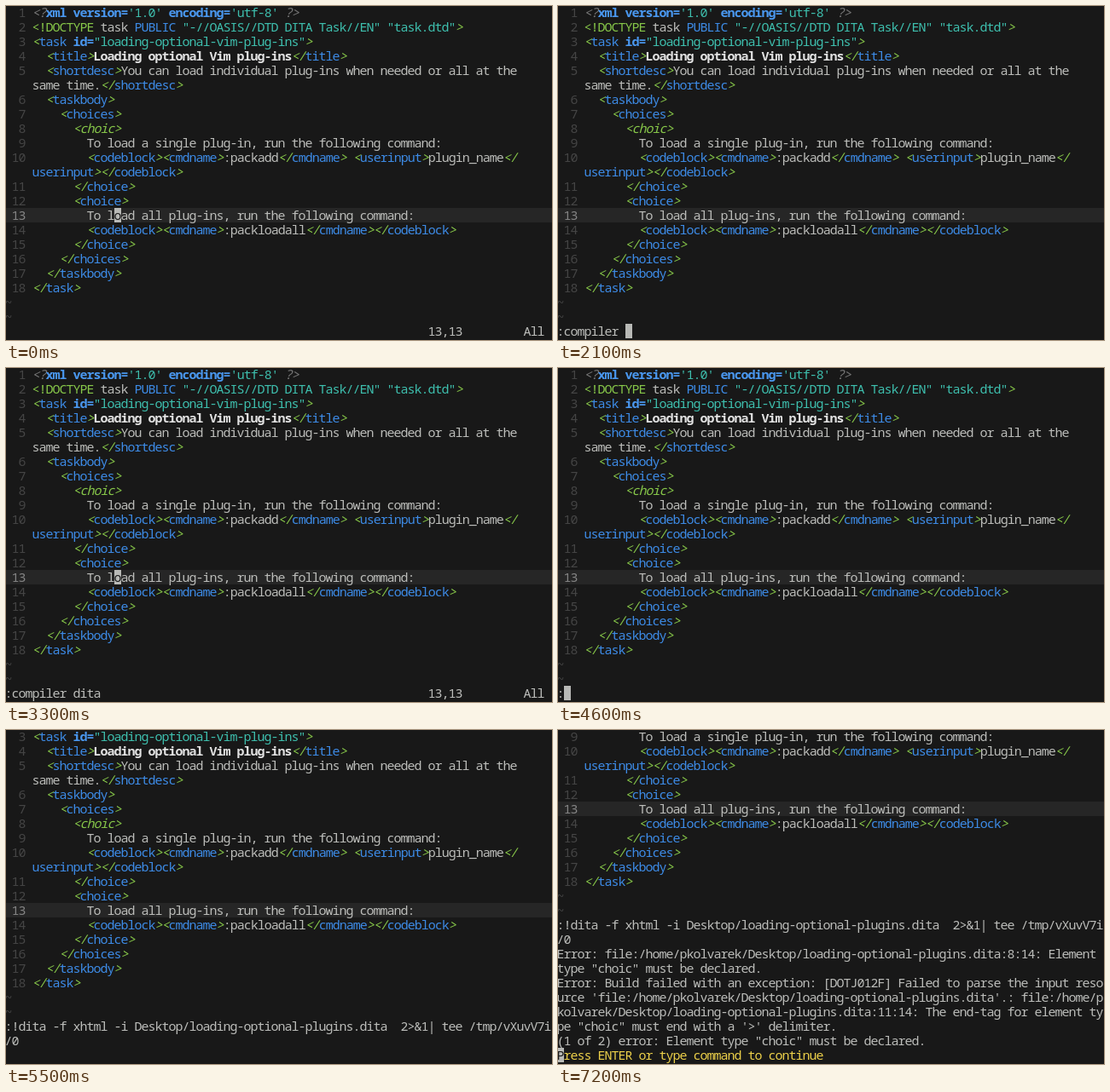
Write an HTML page that moves like this. It is 640x392 px and loops after 8000 ms.

```html
<!DOCTYPE html>
<html lang="en">
<head>
<meta charset="utf-8">
<title>Vim: compiling a DITA topic</title>
<style>
  html, body { margin: 0; width: 100%; height: 100%; overflow: hidden; background: #181818; }
  #stage { position: relative; width: 640px; height: 392px; overflow: hidden; }
  #screen { position: absolute; left: -1px; top: -1px; width: 641px; height: 393px; }
  #buffer, #log { position: absolute; left: 0; width: 100%; }
  .row {
    height: 17px;
    color: #bcbdba;
    font: 15px/17px "Noto Sans Mono", monospace;
    letter-spacing: -1px;
    text-indent: -0.5px;
    font-variant-ligatures: none;
    white-space: pre;
  }
  .current { background: #262626; }
  .num, .tilde { color: #454545; }
  .current .num { color: #858585; }
  .dim { color: #777; font-style: italic; }
  .mark { color: #86c649; font-style: italic; }
  .decl { color: #86c649; }
  .attr { color: #4a98f0; font-weight: 700; }
  .str { color: #3ebfae; }
  .tag { color: #3d8be6; }
  .title { color: #e2e2e2; font-weight: 700; }
  .prompt { color: #ecd04a; }
  #cursor { position: absolute; width: 8px; background: #b8b9b6; color: #181818; }
  #ruler { position: absolute; left: 496px; top: 374px; }
</style>
</head>
<body>
<div id="stage">
  <div id="screen">
    <div id="buffer"></div>
    <div id="log"></div>
    <div id="ruler" class="row">13,13         All</div>
    <div id="cursor" class="row"></div>
  </div>
</div>
<script>
const LOOP = 8000, ROW = 17, COL = 8, LAST = 22;
const $ = id => document.getElementById(id);

// A leading "\" marks the continuation of a wrapped line.
const source = String.raw`<?xml version='1.0' encoding='utf-8' ?>
<!DOCTYPE task PUBLIC "-//OASIS//DTD DITA Task//EN" "task.dtd">
<task id="loading-optional-vim-plug-ins">
  <title>Loading optional Vim plug-ins</title>
  <shortdesc>You can load individual plug-ins when needed or all at the
\same time.</shortdesc>
  <taskbody>
    <choices>
      <choic>
        To load a single plug-in, run the following command:
        <codeblock><cmdname>:packadd</cmdname> <userinput>plugin_name</
\userinput></codeblock>
      </choice>
      <choice>
        To load all plug-ins, run the following command:
        <codeblock><cmdname>:packloadall</cmdname></codeblock>
      </choice>
    </choices>
  </taskbody>
</task>`.split('\n');

const syntax = new RegExp([
  /(?<dim><\?|\?>)/,
  /(?<decl><!DOCTYPE)/,
  /(?<mark><choic>|<\/?|>)/,
  /(?<attr>(?<=<\?)xml|\w+=)/,
  /(?<str>'[^']*'|"[^"]*")/,
  /(?<tag>(?<=<\/?)\w+|PUBLIC|^\w+(?=>))/,
  /(?<title>(?<=<title>)[^<]+)/
].map(r => r.source).join('|'), 'g');

function addText(parent, text, cls) {
  const span = document.createElement('span');
  if (cls) span.className = cls;
  span.textContent = text;
  parent.append(span);
}

function addRow(parent, cls = '') {
  const row = document.createElement('div');
  row.className = 'row ' + cls;
  parent.append(row);
  return row;
}

function highlight(row, text) {
  let pos = 0;
  for (const m of text.matchAll(syntax)) {
    addText(row, text.slice(pos, m.index));
    addText(row, m[0], Object.keys(m.groups).find(k => m.groups[k] !== undefined));
    pos = m.index + m[0].length;
  }
  addText(row, text.slice(pos));
}

let num = 0;
for (const line of source) {
  const wrapped = line[0] === '\\';
  if (!wrapped) num++;
  const row = addRow($('buffer'), num === 13 ? 'current' : '');
  addText(row, (wrapped ? '' : String(num)).padStart(3) + ' ', 'num');
  highlight(row, wrapped ? line.slice(1) : line);
}
for (let i = 0; i < 2; i++) addText(addRow($('buffer')), '~', 'tilde');

const command = `:!dita -f xhtml -i Desktop/loading-optional-plugins.dita  2>&1| tee /tmp/vXuvV7i
/0
`;
const errors = command + `Error: file:/home/pkolvarek/Desktop/loading-optional-plugins.dita:8:14: Element 
type "choic" must be declared.
Error: Build failed with an exception: [DOTJ012F] Failed to parse the input reso
urce 'file:/home/pkolvarek/Desktop/loading-optional-plugins.dita'.: file:/home/p
kolvarek/Desktop/loading-optional-plugins.dita:11:14: The end-tag for element ty
pe "choic" must end with a '>' delimiter.
`;
const prompt = errors + `(1 of 2) error: Element type "choic" must be declared.
Press ENTER or type command to continue`;

// [start ms, command line text, mode]
const steps = [
  [0, '', 'edit'],
  [500, ':', 'type'],
  [800, ':c', 'type'],
  [900, ':co', 'type'],
  [1000, ':com', 'type'],
  [1200, ':comp', 'type'],
  [1400, ':compil', 'type'],
  [1500, ':compiler', 'type'],
  [2100, ':compiler ', 'type'],
  [2200, ':compiler d', 'type'],
  [2300, ':compiler di', 'type'],
  [2500, ':compiler dit', 'type'],
  [2700, ':compiler dita', 'type'],
  [3200, ':compiler dita', 'busy'],
  [3300, ':compiler dita', 'edit'],
  [4600, ':', 'type'],
  [5000, ':m', 'type'],
  [5100, ':ma', 'type'],
  [5200, ':mak', 'type'],
  [5300, ':make', 'type'],
  [5500, command, 'busy'],
  [7100, errors, 'busy'],
  [7200, prompt, 'prompt']
];

function placeCursor(col, row, char = '') {
  const cursor = $('cursor');
  cursor.style.left = col * COL + 'px';
  cursor.style.top = row * ROW + 'px';
  cursor.textContent = char;
}

function show([, text, mode]) {
  const lines = text.split('\n');
  const scroll = lines.length - 1;
  $('buffer').style.top = -scroll * ROW + 'px';
  $('log').style.top = (LAST - scroll) * ROW + 'px';
  $('log').replaceChildren();
  for (const line of lines)
    addText(addRow($('log')), line, line.startsWith('Press') ? 'prompt' : '');

  $('ruler').hidden = mode !== 'edit';
  $('cursor').hidden = mode === 'busy';
  if (mode === 'edit') placeCursor(16, 14, 'o');
  if (mode === 'type') placeCursor(text.length, LAST);
  if (mode === 'prompt') placeCursor(0, LAST, 'P');
}

let shown;
function tick() {
  const t = performance.now() % LOOP;
  const step = steps.findLast(s => s[0] <= t);
  if (step !== shown) show(shown = step);
  requestAnimationFrame(tick);
}
tick();
</script>
</body>
</html>
```
